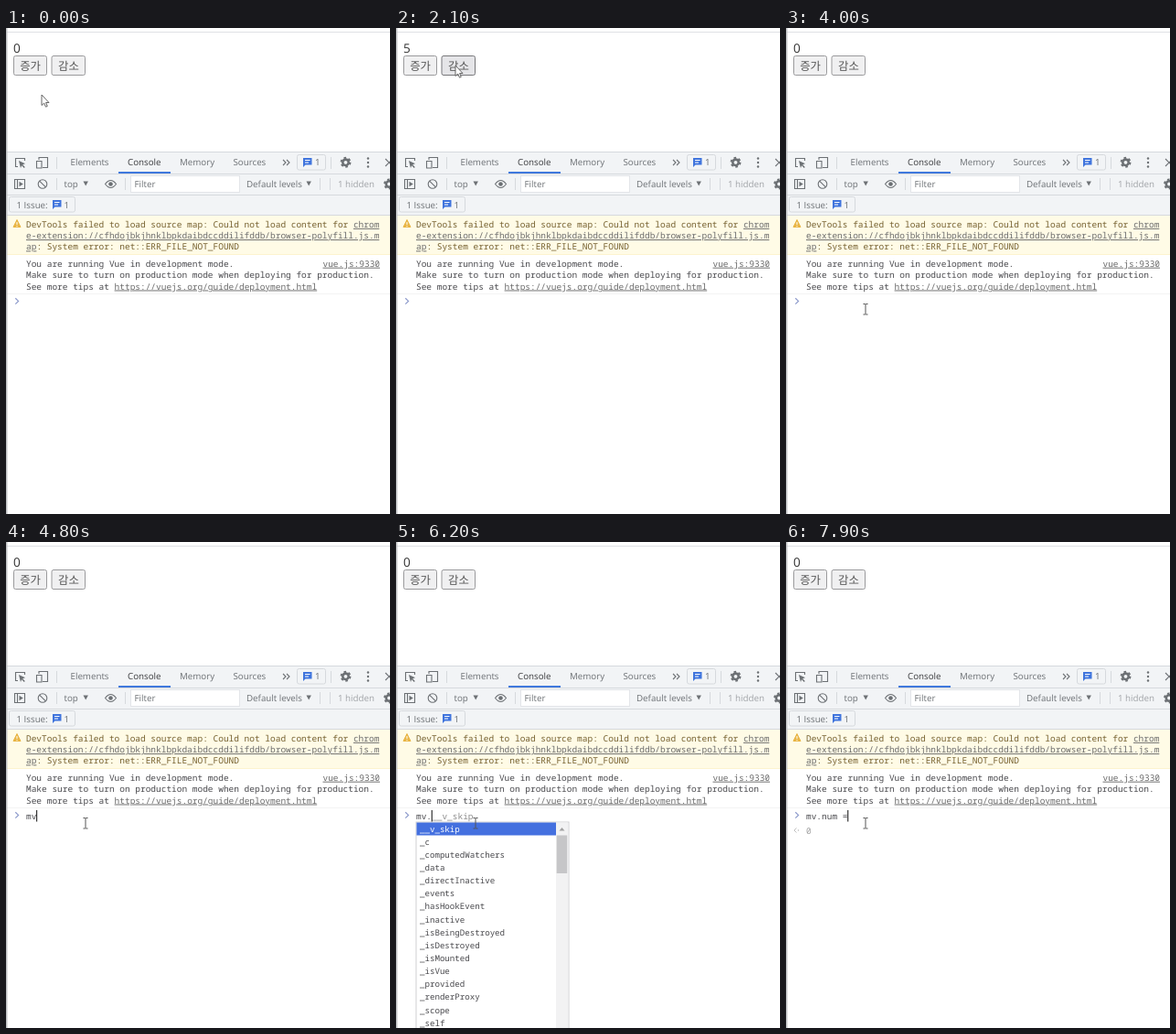
An HTML page that plays this animation: 420 px wide and 531 px high, repeating every 8000 ms.

```html
<!DOCTYPE html>
<html lang="ko">
<head>
<meta charset="utf-8">
<title>Counter console</title>
<style>
  html, body { margin: 0; width: 100%; height: 100%; overflow: hidden; background: #fff; }
  svg { display: block; width: 420px; height: 531px; }
  text { white-space: pre; text-rendering: geometricPrecision; }
  .ui { font: 9.75px "Open Sans", "Noto Sans", sans-serif; fill: #6c7074; }
  .mono { font: 9.48px "Noto Sans Mono", "DejaVu Sans Mono", monospace; fill: #4a4a4e; }
  .warn { fill: #75602f; }
  .link { text-decoration: underline; fill: #6c6c6c; }
  .ko { font: 12.4px "Noto Sans CJK KR", "Noto Sans CJK", sans-serif; fill: #555; }
  .count { font: 13.6px "Open Sans", sans-serif; fill: #333; }
  .item { font-size: 9.15px; }
  .line { fill: none; stroke: #6c7074; stroke-width: 1.1; }
  .rule { fill: none; stroke: #d6d9dd; }
  .btn { fill: #f0f0f1; stroke: #9a9a9c; }
  .btn.hover { fill: #e5e5e8; stroke: #77777a; }
  .btn.down { fill: #f5f5f5; stroke: #a2a2a4; }
</style>
</head>
<body>
<svg viewBox="0 0 420 531">
  <defs>
    <g id="gear" fill="none" stroke="#6c7074">
      <circle r="3.2" stroke-width="2.6"/>
      <circle r="5" stroke-width="1.9" stroke-dasharray="2.6 2.636"/>
    </g>
    <g id="chat">
      <path d="M0 0H9.5V7.5H2.5L0 10Z" fill="#3f74dd"/>
      <path d="M2 2.5H7.5M2 5H6" stroke="#fff"/>
    </g>
    <path id="drop" d="M0 0H5.4L2.7 5Z" fill="#6c7074"/>
  </defs>

  <!-- page -->
  <path d="M0 4.5H420" stroke="#dfe1e5"/>
  <text id="count" class="count" x="8" y="27">0</text>
  <rect id="inc" class="btn" x="8.5" y="30.5" width="36" height="21" rx="2"/>
  <rect id="dec" class="btn" x="50" y="30.5" width="36.5" height="21" rx="2"/>
  <text class="ko" x="15.2" y="45.6">증가</text>
  <text class="ko" x="57" y="45.6">감소</text>

  <!-- tool bars -->
  <rect y="135" width="420" height="70" fill="#f2f4f6"/>
  <path class="rule" d="M0 135.5H420M0 159.5H420M0 182.5H420M0 204.5H420"/>
  <path class="rule" d="M55.5 141V154M355.5 141V154M55.5 164V177M130.5 164V177M343.5 164V177M354.5 164V177"/>
  <path class="line" d="M13 151.5H10.5V142.5H20.5V145"/>
  <path d="M14 145L21 148.2L18.2 149.3L20.8 152L19.8 153L17.2 150.3L16 153Z" fill="#6c7074"/>
  <path class="line" d="M36 144V141.5H45.5V152.5H40M33.5 145.5H39V153H33.5Z"/>
  <g class="ui">
    <text x="70.5" y="150.4">Elements</text>
    <text x="133" y="150.4" style="fill:#3a3b3e">Console</text>
    <text x="190" y="150.4">Memory</text>
    <text x="248.5" y="150.4">Sources</text>
    <text x="63.5" y="173.6">top</text>
  </g>
  <rect x="123" y="157" width="57" height="2" fill="#3f78dd"/>
  <path class="line" d="M303 144L306 147L303 150M307 144L310 147L307 150"/>
  <rect class="rule" x="318.5" y="138.5" width="31" height="16.5" rx="2"/>
  <use href="#chat" x="325" y="142"/>
  <text class="ui" x="338" y="150.4">1</text>
  <use href="#gear" x="371.5" y="146.8"/>
  <g fill="#6c7074">
    <circle cx="396" cy="142.5" r="1.2"/><circle cx="396" cy="147" r="1.2"/><circle cx="396" cy="151.5" r="1.2"/>
  </g>
  <path class="line" d="M415 143L423 151M423 143L415 151"/>

  <path class="line" d="M9.5 165.5H20.5V175.5H9.5ZM12.5 165.5V175.5"/>
  <path d="M14.5 167.8L18.8 170.5L14.5 173.2Z" fill="#6c7074"/>
  <g class="line"><circle cx="40" cy="170.5" r="4.8"/><path d="M36.6 167.1L43.4 173.9"/></g>
  <use href="#drop" x="84.5" y="167.5"/>
  <path class="line" d="M108.5 170.5Q114.5 162.5 120.5 170.5Q114.5 178.5 108.5 170.5Z"/>
  <circle cx="114.5" cy="170.5" r="2.3" fill="#6c7074"/>
  <rect x="136.5" y="161.5" width="119" height="18" fill="#fff" stroke="#e3e5e9"/>
  <text class="ui" x="140.5" y="173.8">Filter</text>
  <text class="ui" x="263" y="173.6">Default levels</text>
  <use href="#drop" x="328.5" y="167.5"/>
  <text class="ui" x="363" y="173.6" style="fill:#a0a3a7">1 hidden</text>
  <use href="#gear" x="419" y="170.5"/>

  <rect class="rule" x="3.5" y="184.5" width="72" height="16.5" rx="2"/>
  <text class="ui" x="11.5" y="196.5">1 Issue:</text>
  <use href="#chat" x="51" y="188"/>
  <text class="ui" x="63.5" y="196.5">1</text>

  <!-- console -->
  <rect y="205" width="420" height="43" fill="#fffbe6"/>
  <path d="M0 247.5H420" stroke="#fdf3cf"/>
  <path d="M12 209.5L16 217.5H8Z" fill="#e9b544" stroke="#e9b544" stroke-linejoin="round"/>
  <path d="M12 212V215M12 216V217.2" stroke="#fff"/>
  <g class="mono warn">
    <text x="22" y="217.9">DevTools failed to load source map: Could not load content for <tspan class="link">chrom</tspan></text>
    <text x="22" y="230.1" class="link">e-extension://cfhdojbkjhnklbpkdaibdccddilifddb/browser-polyfill.js.m</text>
    <text x="22" y="242.4"><tspan class="link">ap</tspan>: System error: net::ERR_FILE_NOT_FOUND</text>
  </g>
  <g class="mono">
    <text x="22" y="260.7">You are running Vue in development mode.</text>
    <text x="409" y="260.7" text-anchor="end" class="link">vue.js:9330</text>
    <text x="22" y="273.1">Make sure to turn on production mode when deploying for production.</text>
    <text x="22" y="285.5">See more tips at <tspan class="link">https://vuejs.org/guide/deployment.html</tspan></text>
  </g>
  <path d="M0 290.5H420" stroke="#f3f3f3"/>
  <path d="M10.3 295.2L13.6 298.4L10.3 301.6" fill="none" stroke="#8b99cb" stroke-width="1.2"/>
  <text class="mono" x="22" y="302.6"><tspan id="typed"></tspan><tspan id="ghost" fill="#8c8c8c"></tspan></text>
  <g id="result" fill="none" stroke="#c0c0c0">
    <path d="M11.5 312.5L9 315L11.5 317.5"/>
    <circle cx="13.5" cy="315" r=".4"/>
    <text class="mono" x="22" y="318.7" stroke="none" style="fill:#a0a0a0">0</text>
  </g>
  <g id="popup"></g>
  <rect id="caret" y="293" width="1.2" height="12.5" fill="#333"/>
  <path d="M.75 0V531" stroke="#bfc1c4" stroke-width="1.5"/>

  <path id="arrow" d="M0 0V11.5L2.7 9.1L4.5 13.2L6.3 12.4L4.6 8.5H8Z" fill="#fff" stroke="#555" stroke-width=".9"/>
  <path id="beam" d="M-2.5 -5.5H-.7L0 -5L.7 -5.5H2.5M0 -5V5.5M-2.5 6H-.7L0 5.5L.7 6H2.5" fill="none" stroke="#555"/>
</svg>
<script>
const $ = id => document.getElementById(id);
const LOOP = 8000, STEP = 100, CHAR = 5.69, ROW = 14.13;

const members = `__v_skip _c _computedWatchers _data _directInactive _events _hasHookEvent _inactive
  _isBeingDestroyed _isDestroyed _isMounted _isVue _provided _renderProxy _scope _self`.split(/\s+/);
const globals = `matchMedia menubar moveBy moveTo mv Map Math MathMLElement MediaCapabilities MediaDeviceInfo
  MediaDevices MediaElementAudioSourceNode MediaEncryptedEvent MediaError MediaKeyMessageEvent MediaKeys`.split(/\s+/);

// what the completion list offers for each typed text
const hints = {
  'm': { items: globals, right: 227, ghost: 'atchMedia' },
  'mv.': { items: members, right: 188.5, ghost: '__v_skip' },
  'mv.n': { items: ['num'], right: 74, ghost: 'um' },
  'mv.nu': { items: ['num'], right: 74, ghost: 'm' }
};

const typing = [[0, ''], [4500, 'm'], [4800, 'mv'], [5000, 'mv.'], [5300, 'm'], [5400, ''],
  [5600, 'm'], [5800, 'mv'], [6100, 'mv.'], [6600, 'mv.n'], [6800, 'mv.nu'], [7000, 'mv.num'],
  [7600, 'mv.num '], [7800, 'mv.num =']];
const caretOn = [[0, 0], [3500, 1], [4000, 0], [4400, 1]];
const ups = [500, 700, 900, 1100, 1300, 1600];
const downs = [2100, 2300, 2400, 2600, 2700, 2900];
const path = [[0, 39, 73], [100, 39, 73], [400, 26, 44], [1700, 26, 44], [2000, 65, 41],
  [3000, 65, 41], [3300, 80, 200], [3500, 91, 322], [3700, 87, 307], [8000, 87, 307]];

const at = (table, t) => table.filter(e => e[0] <= t).pop()[1];
const passed = (times, t) => times.filter(x => x <= t).length;

function pointer(t) {
  const i = path.findIndex(p => p[0] > t);
  const [t0, x0, y0] = path[i - 1], [t1, x1, y1] = path[i];
  const k = (t - t0) / (t1 - t0), e = k * k * (3 - 2 * k);
  return [x0 + (x1 - x0) * e, y0 + (y1 - y0) * e];
}

function popupMarkup({ items, right }) {
  const long = items.length > 1, h = long ? 240 : ROW + 2;
  const end = long ? right - 13.5 : right;
  let s = `<rect x="22" y="306" width="${right - 21.5}" height="${h}" fill="#fff" stroke="#cfcfd2"/>
    <rect x="22.5" y="306.5" width="${end - 22.5}" height="14" fill="#4470df"/>`;
  items.forEach((name, i) => {
    s += `<text class="mono item" x="26" y="${316.7 + i * ROW}"${i ? '' : ' style="fill:#fff"'}>${name}</text>`;
  });
  if (long) {
    s += `<rect x="${end}" y="306.5" width="13" height="230" fill="#f2f2f3"/>
      <rect x="${end + .7}" y="320.5" width="11.5" height="41.5" fill="#c6c6c8"/>
      <path d="M${end + 3.5} 315.5H${end + 9.5}L${end + 6.5} 312Z" fill="#a0a0a0"/>`;
  }
  return s;
}

let shown = null;
function setTyped(text) {
  if (text === shown) return;
  shown = text;
  const hint = hints[text];
  $('typed').textContent = text;
  $('ghost').textContent = hint ? hint.ghost : '';
  $('popup').innerHTML = hint ? popupMarkup(hint) : '';
  $('caret').setAttribute('x', 21.6 + text.length * CHAR);
}

function setButton(id, hover, clicks, t) {
  const down = clicks.some(c => c - STEP === t);
  $(id).setAttribute('class', 'btn' + (hover ? down ? ' down' : ' hover' : ''));
}

function draw(t) {
  const [x, y] = pointer(t);
  const overRow = y >= 30 && y < 52;
  const isBeam = y > 205;
  $('count').textContent = passed(ups, t) - passed(downs, t);
  setButton('inc', overRow && x >= 8 && x < 45, ups, t);
  setButton('dec', overRow && x >= 50 && x < 87, downs, t);
  setTyped(at(typing, t));
  $('caret').style.opacity = at(caretOn, t);
  $('result').style.opacity = t >= 6800 ? 1 : 0;
  for (const id of ['arrow', 'beam']) {
    $(id).setAttribute('transform', `translate(${x} ${y})`);
    $(id).style.opacity = (id === 'beam') === isBeam ? 1 : 0;
  }
}

const start = performance.now();
function tick() {
  const t = (performance.now() - start) % LOOP;
  draw(Math.floor(t / STEP) * STEP);
  requestAnimationFrame(tick);
}
draw(0);
tick();
</script>
</body>
</html>
```
